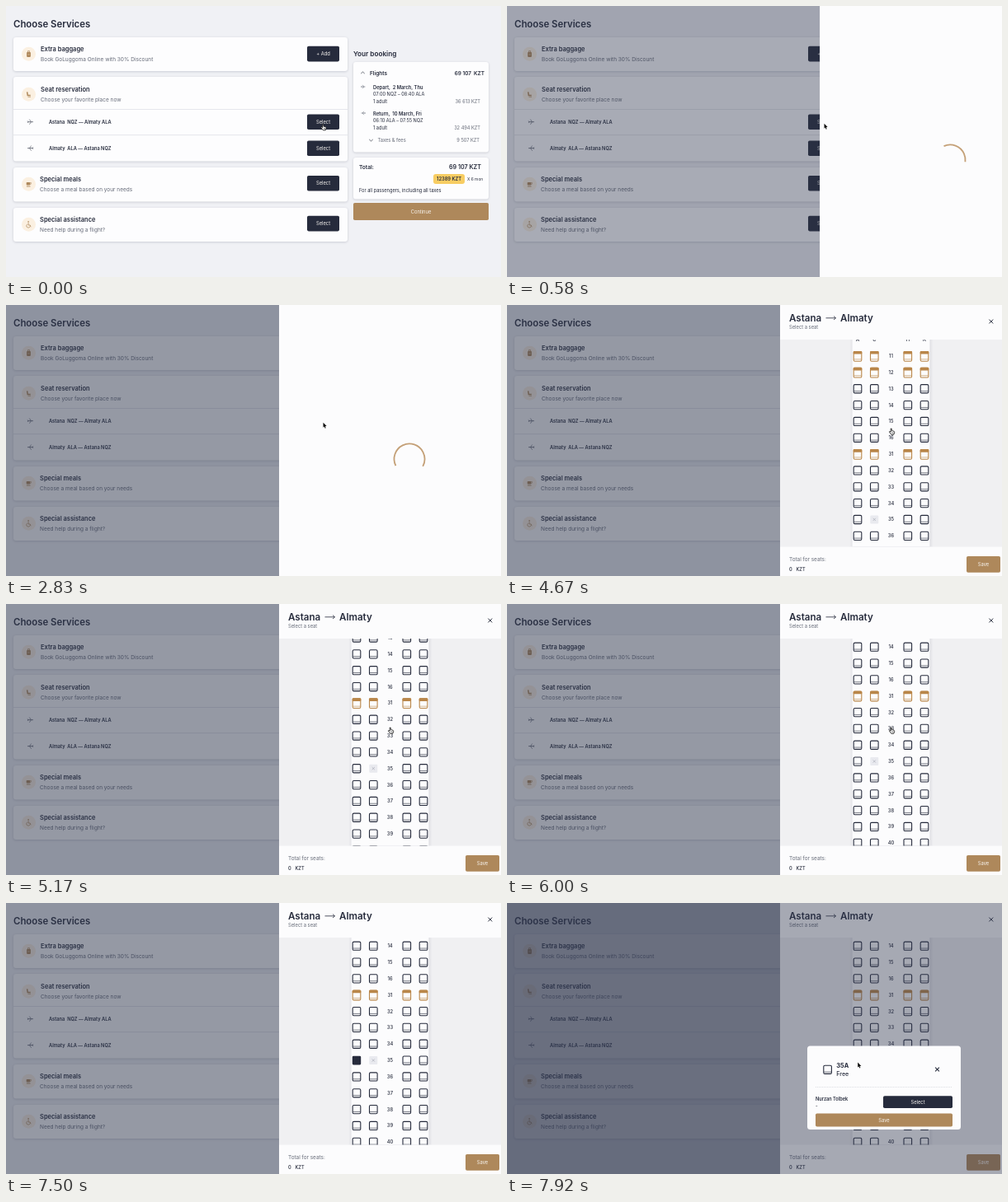
These frames come from a looping animation (600 by 329 pixels, 8000 ms). An HTML page with a canvas:

```html
<!DOCTYPE html>
<html lang="en">
<head>
<meta charset="utf-8">
<title>Choose Services</title>
<style>
html, body { margin: 0; width: 100%; height: 100%; overflow: hidden; background: #f0f1f5; }
canvas { display: block; width: 600px; height: 329px; }
</style>
</head>
<body>
<canvas id="stage"></canvas>
<script>
const W = 600, H = 329, LOOP = 8000;
const canvas = document.getElementById('stage');
const ctx = canvas.getContext('2d');
const ratio = window.devicePixelRatio || 1;
canvas.width = W * ratio;
canvas.height = H * ratio;

const INK = '#262b3c', GREY = '#666b78', BROWN = '#ae885b', PAPER = '#fcfcfd';
const DRAWER_X = 331;

const clamp = v => Math.max(0, Math.min(1, v));
const span = (t, a, b) => clamp((t - a) / (b - a));
const mix = (a, b, k) => a + (b - a) * k;
const easeOut = k => 1 - (1 - k) ** 3;
const easeInOut = k => k * k * (3 - 2 * k);

function text(str, x, y, size, weight = 400, color = INK, align = 'left') {
  ctx.font = `${weight} ${size}px Inter, sans-serif`;
  ctx.fillStyle = color;
  ctx.textAlign = align;
  ctx.fillText(str, x, y);
}

function box(x, y, w, h, r, color) {
  ctx.fillStyle = color;
  ctx.beginPath();
  ctx.roundRect(x, y, w, h, r);
  ctx.fill();
}

function line(points, color, width = 0.7) {
  ctx.strokeStyle = color;
  ctx.lineWidth = width;
  ctx.beginPath();
  points.forEach(([x, y], i) => i ? ctx.lineTo(x, y) : ctx.moveTo(x, y));
  ctx.stroke();
}

function disc(x, y, r, color) {
  ctx.fillStyle = color;
  ctx.beginPath();
  ctx.arc(x, y, r, 0, 2 * Math.PI);
  ctx.fill();
}

function at(x, y, draw, sx = 1, sy = sx) {
  ctx.save();
  ctx.translate(x, y);
  ctx.scale(sx, sy);
  draw();
  ctx.restore();
}

function card(x, y, w, h) {
  ctx.save();
  ctx.shadowColor = 'rgba(40,45,70,.2)';
  ctx.shadowBlur = 3 * ratio;
  ctx.shadowOffsetY = 0.8 * ratio;
  box(x, y, w, h, 3, '#fdfdfe');
  ctx.restore();
}

function button(label, x, y, w, h, color) {
  box(x, y, w, h, 1.8, color);
  text(label, x + w / 2, y + h / 2 + 2.1, 5.8, 400, '#f8f5f1', 'center');
}

function plane(x, y, dir, size, color) {
  at(x, y, () => {
    line([[-4, 0], [4, 0]], color, 1.1);
    line([[-1.3, -3.6], [1.2, 0], [-1.3, 3.6]], color, 0.9);
    line([[-4, -1.5], [-3, 0], [-4, 1.5]], color, 0.8);
  }, dir * size, size);
}

function chevron(x, y, dir) {
  line([[x - 2.2, y + dir], [x, y - dir], [x + 2.2, y + dir]], INK, 0.7);
}

function cross(x, y, s, color, width) {
  line([[x - s, y - s], [x + s, y + s]], color, width);
  line([[x + s, y - s], [x - s, y + s]], color, width);
}

const icons = {
  bag() {
    box(-2.4, -2.2, 4.8, 5.8, 0.8, BROWN);
    line([[-1, -2], [-1, -3.7], [1, -3.7], [1, -2]], BROWN);
    line([[-1.2, 0.5], [1.2, 0.5]], '#e9d2b0', 0.6);
  },
  seat() {
    line([[-1.9, -3], [-1.2, 1.3], [2.2, 1.3]], BROWN, 1.5);
    line([[-1, 3], [2.5, 3]], BROWN, 0.7);
  },
  meal() {
    box(-2.8, -2.4, 4.5, 3.6, 0.8, BROWN);
    line([[1.5, -1.7], [3, -1.7], [2.6, 0.1], [1.5, 0.1]], BROWN, 0.6);
    line([[-2.6, 2.7], [2, 2.7]], BROWN, 0.9);
  },
  chair() {
    disc(-0.4, -3.4, 0.8, BROWN);
    line([[-0.4, -2], [-0.4, 0.7], [1.7, 0.7], [2.5, 3]], BROWN, 0.8);
    ctx.lineWidth = 0.7;
    ctx.beginPath();
    ctx.arc(-0.5, 1.6, 2.2, 0.3, 4.2);
    ctx.stroke();
  }
};

function service(icon, x, y, title, note, label) {
  disc(27.5, y + 0.3, 8.5, '#fbf0e1');
  at(27.5, y + 0.3, icons[icon]);
  text(title, x, y - 3, 7.5, 600);
  text(note, x, y + 9, 6.5, 400, GREY);
  if (label) button(label, 365, y - 9.2, 39, 18.6, INK);
}

function leg(y, head, hours, price, dir) {
  plane(433, y - 3, dir, 0.6, GREY);
  text(head, 445, y, 5.75, 600);
  text(hours, 445, y + 8, 5.55);
  text('1 adult', 445, y + 16.5, 5.6);
  text(price, 575, y + 16.5, 5.65, 400, GREY, 'right');
}

function page() {
  ctx.fillStyle = '#f0f1f5';
  ctx.fillRect(0, 0, W, H);
  text('Choose Services', 9, 25.5, 11.4, 600);

  card(9, 38, 405, 41);
  service('bag', 42, 58, 'Extra baggage', 'Book GoLuggoma Online with 30% Discount', '+ Add');
  card(9, 86, 405, 102.5);
  service('seat', 42, 107, 'Seat reservation', 'Choose your favorite place now');
  [125.5, 156.7].forEach(y => line([[9, y], [414, y]], '#e3e4ea', 0.9));
  [['Astana  NQZ — Almaty ALA', 140.7, 1], ['Almaty  ALA — Astana NQZ', 172.6, -1]].forEach(([name, y, dir]) => {
    plane(29.5, y, dir, 0.85, '#6b6f7b');
    text(name, 52, y + 2, 5.7, 600);
    button('Select', 365, y - 9.2, 39, 18.6, INK);
  });
  card(9, 196, 405, 41.5);
  service('meal', 41, 216, 'Special meals', 'Choose a meal based on your needs');
  button('Select', 365, 206, 39, 18.6, INK);
  card(9, 245, 405, 41);
  service('chair', 41, 265, 'Special assistance', 'Need help during a flight?');
  button('Select', 365, 254.8, 39, 18.6, INK);

  text('Your booking', 421, 61, 8.2, 600);
  card(421, 68, 164, 109.5);
  chevron(432.5, 81, 1);
  text('Flights', 441, 84, 6.5, 600);
  text('69 107  KZT', 580, 84, 6.4, 600, INK, 'right');
  leg(101, 'Depart,  2 March, Thu', '07:00 NQZ – 08:40 ALA', '36 613 KZT', 1);
  leg(133, 'Return,  10 March, Fri', '06:10 ALA – 07:55 NQZ', '32 494 KZT', -1);
  chevron(442.5, 163, -1);
  text('Taxes & fees', 450.5, 165.4, 5.7, 400, GREY);
  text('9 507 KZT', 574, 165.4, 5.65, 400, GREY, 'right');

  card(421, 184, 164, 50.5);
  text('Total:', 428, 197.7, 6.6, 600);
  text('69 107 KZT', 576, 198, 7.2, 600, INK, 'right');
  box(518, 204, 38, 12, 3, '#f8cd63');
  text('12389 KZT', 537, 212.1, 5.75, 600, INK, 'center');
  text('X 6 mon', 559, 211.7, 4.9);
  text('For all passengers, including all taxes', 428, 226.3, 5.65);
  button('Continue', 421, 239, 164, 21, BROWN);
}

function veil(alpha) {
  ctx.fillStyle = `rgba(46,54,77,${alpha})`;
  ctx.fillRect(0, 0, W, H);
}

function spinner(t) {
  const p = (((t - 920) / 1556 + 0.44) % 1 + 1) % 1;
  const grow = easeInOut(clamp(p * 2)), slide = easeInOut(clamp(p * 2 - 1));
  const turn = 2 * Math.PI, unit = turn / 125.66;
  const shift = 15 * grow + 109 * slide;
  const size = Math.min(mix(1, 100, grow), 125.66 - shift);
  const from = (148 / 360 + p) * turn + shift * unit;
  ctx.strokeStyle = '#c4a077';
  ctx.lineWidth = 1.8;
  ctx.beginPath();
  ctx.arc(489, 187, 18.5, from, from + size * unit);
  ctx.stroke();
}

function seat(x, y, kind) {
  if (kind === 'blocked') {
    box(x - 5, y - 5, 10, 10, 1, '#e9eaef');
    cross(x, y, 1.6, '#a9adb8', 0.7);
    return;
  }
  if (kind === 'picked') return box(x - 5.2, y - 5.2, 10.4, 10.6, 1.3, INK);
  const wide = kind === 'extra';
  const color = wide ? '#b98649' : INK;
  const top = wide ? y - 5.5 : y - 5;
  const h = wide ? 11.7 : 10.2;
  ctx.strokeStyle = color;
  ctx.lineWidth = 1.1;
  ctx.beginPath();
  ctx.roundRect(x - 4.8, top, 9.6, h, 1.4);
  ctx.stroke();
  line([[x - 4.5, top + h - 2.3], [x + 4.5, top + h - 2.3]], color, 0.6);
  if (wide) box(x - 5.3, top - 0.5, 10.6, 3.6, 1, color);
}

const columns = { A: 425, C: 445.3, H: 485.8, K: 506 };
const rows = Array.from({ length: 28 }, (_, i) => i < 6 ? 11 + i : 25 + i);

function scrollAt(t) {
  if (t < 4670) return mix(80, 62.2, easeInOut(span(t, 4450, 4670)));
  return mix(62.2, -7.4, easeOut(span(t, 4670, 5670)));
}

function seatMap(t) {
  ctx.save();
  ctx.beginPath();
  ctx.rect(DRAWER_X, 42, W - DRAWER_X, 251.5);
  ctx.clip();
  ctx.fillStyle = '#f0f0f2';
  ctx.fillRect(DRAWER_X, 42, W, 252);
  const first = scrollAt(t);
  ctx.save();
  ctx.shadowColor = 'rgba(40,45,70,.16)';
  ctx.shadowBlur = 4 * ratio;
  ctx.fillStyle = PAPER;
  ctx.fillRect(418.5, first - 29, 94, 640);
  ctx.restore();
  for (const [name, x] of Object.entries(columns)) text(name, x, first - 17.5, 5.8, 500, INK, 'center');
  rows.forEach((row, i) => {
    const y = first + i * 19.84;
    if (y < 30 || y > 305) return;
    text(row, 465.5, y + 2.1, 5.8, 500, INK, 'center');
    for (const [name, x] of Object.entries(columns)) {
      let kind = [11, 12, 31].includes(row) ? 'extra' : 'free';
      if (row === 35 && name === 'C') kind = 'blocked';
      if (row === 35 && name === 'A' && t >= 7170) kind = 'picked';
      seat(x, y, kind);
    }
  });
  ctx.restore();
}

function seatPanel(t) {
  text('Astana', 342, 19.8, 11.6, 600);
  line([[386.5, 15.8], [398.5, 15.8]], INK, 0.8);
  line([[396, 13.6], [398.5, 15.8], [396, 18]], INK, 0.8);
  text('Almaty', 404, 19.8, 11.6, 600);
  text('Select a seat', 342, 29.3, 5.8, 400, GREY);
  cross(586.8, 20, 2.4, INK, 1);
  seatMap(t);
  text('Total for seats:', 342, 310.7, 6.4, 400, GREY);
  text('0', 342, 323.2, 5.7, 500);
  text('KZT', 350.5, 323.2, 5.6, 500);
  button('Save', 557, 305, 41, 19.8, BROWN);
}

function modal(k) {
  ctx.save();
  ctx.globalAlpha = k;
  box(364, 173.5, 186, 101.5, 3.5, PAPER);
  seat(388.6, 202.2, 'free');
  text('35A', 399.3, 199.8, 7.4, 700);
  text('Free', 399.3, 210.3, 7.1, 500);
  cross(521.5, 202, 2.4, INK, 1.1);
  ctx.setLineDash([1, 1]);
  line([[374, 223.5], [540, 223.5]], '#cfd1d8', 0.7);
  ctx.setLineDash([]);
  text('Nurzan Tolbek', 374, 239.5, 5.6, 600);
  text('-', 374, 247.5, 5.6, 500);
  button('Select', 456, 234.3, 84, 14.7, INK);
  button('Save', 374, 255.5, 166, 16, BROWN);
  ctx.restore();
}

function outline(points) {
  ctx.beginPath();
  points.forEach(([x, y], i) => i ? ctx.lineTo(x, y) : ctx.moveTo(x, y));
  ctx.closePath();
}

function arrow(x, y) {
  at(x, y, () => {
    outline([[0, 0], [0, 6], [1.3, 4.8], [2.2, 6.9], [3.2, 6.5], [2.3, 4.4], [4.2, 4.3]]);
    ctx.strokeStyle = '#fff';
    ctx.lineWidth = 0.9;
    ctx.stroke();
    ctx.fillStyle = '#111';
    ctx.fill();
  });
}

function hand(x, y) {
  at(x, y, () => {
    outline([[-1.4, -3.2], [-0.3, -3.2], [0, -0.7], [2.7, 0], [3.2, 1.3], [2.3, 4], [-0.7, 4], [-3.2, 0.6], [-2.5, 0], [-1.2, 0.8]]);
    ctx.lineJoin = 'round';
    ctx.fillStyle = '#fff';
    ctx.fill();
    ctx.strokeStyle = '#111';
    ctx.lineWidth = 0.8;
    ctx.stroke();
    line([[0.3, 1.2], [0.4, 2.8]], '#111', 0.5);
    line([[1.5, 1.2], [1.5, 2.8]], '#111', 0.5);
  });
}

function cursor(t) {
  if (t < 580) return hand(385, 146.8);
  if (t < 3500) return arrow(384.5, 142.8);
  if (t < 6000) {
    const k = easeInOut(span(t, 3500, 4400));
    return hand(mix(385, 466.5, k), mix(146, 153.3, k));
  }
  if (t < 7170) {
    const k = easeInOut(span(t, 6050, 7170));
    return hand(mix(466.5, 425, k), mix(153.3, 193, k));
  }
  if (t >= 7600) arrow(425.2, 193.6);
}

function draw(t) {
  ctx.setTransform(ratio, 0, 0, ratio, 0, 0);
  page();
  if (t >= 250 && t < 330) disc(384.5, 142.5, 13, 'rgba(150,153,165,.25)');
  const open = easeOut(span(t, 450, 750));
  if (open > 0) {
    veil(0.5 * open);
    at((W - DRAWER_X) * (1 - open), 0, () => {
      ctx.fillStyle = PAPER;
      ctx.fillRect(DRAWER_X, 0, W - DRAWER_X, H);
      if (t < 3330) spinner(t);
      else seatPanel(t);
    });
  }
  const shown = easeOut(span(t, 7560, 7860));
  if (shown > 0) {
    veil(0.42 * shown);
    modal(shown);
  }
  cursor(t);
}

const start = performance.now();
function tick() {
  draw((performance.now() - start) % LOOP);
  requestAnimationFrame(tick);
}
tick();
</script>
</body>
</html>
```
